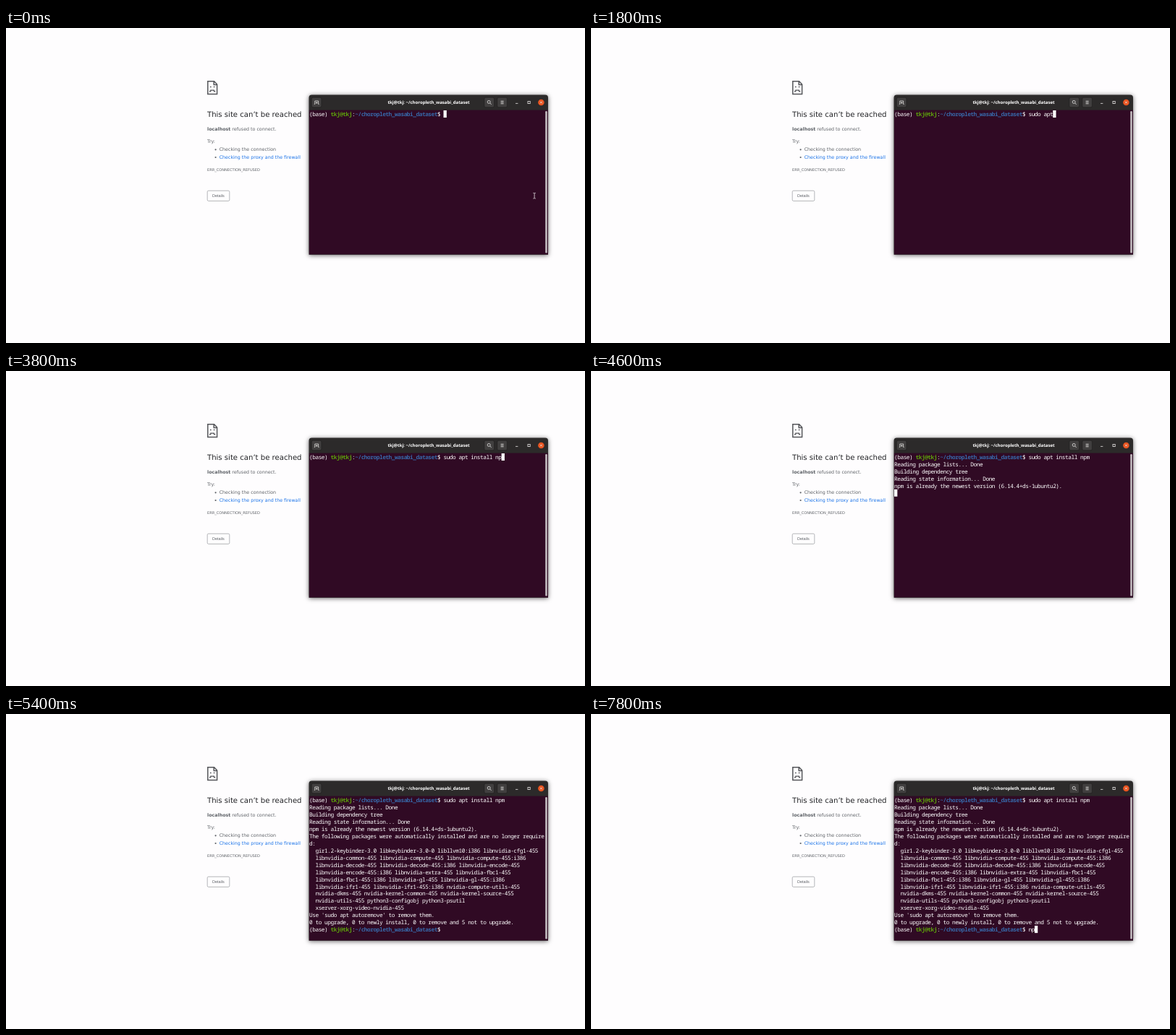
These frames come from a looping animation (800x436 px, 8 s). An HTML page:

```html
<!DOCTYPE html>
<html lang="en">
<head>
<meta charset="utf-8">
<title>Terminal install</title>
<style>
html, body { margin: 0; width: 800px; height: 436px; overflow: hidden; background: #fefdfe; }
svg { display: block; text-rendering: geometricPrecision; }
text { white-space: pre; }
.page { font: 6.32px "DejaVu Sans", sans-serif; fill: #5f6368; }
.term { font: 7.8px "Noto Sans Mono", monospace; fill: #fff; }
.user { fill: #5c9f0c; font-weight: 700; }
.path { fill: #3768a8; font-weight: 700; }
.line { fill: none; stroke: #e8e6e5; stroke-width: .8; }
.shadow { filter: drop-shadow(0 1px 3px rgba(0, 0, 0, .6)); }
</style>
</head>
<body>
<svg width="800" height="436" viewBox="0 0 800 436">
  <g fill="none" stroke="#55565a" stroke-width="1.5">
    <path d="M287.6 73.7H278.8V91.5H291.6V78ZM287.2 73.7V78.4H291.6"/>
    <path d="M281.6 88.6V87.6H282.8V86.2H287.4V87.6H288.6V88.6" stroke-width="1.2"/>
    <path d="M282 81.6h1.6M286.8 81.6h1.6"/>
  </g>
  <g class="page">
    <text x="278" y="123.4" font-size="10.1" style="font-size:10.1px" fill="#202124">This site can’t be reached</text>
    <text x="278" y="141.7"><tspan font-weight="700">localhost</tspan> refused to connect.</text>
    <text x="278" y="159.2">Try:</text>
    <circle cx="289.6" cy="168.3" r="1.1"/>
    <circle cx="289.6" cy="179" r="1.1"/>
    <text x="294.7" y="170.2">Checking the connection</text>
    <text x="294.7" y="180.9" fill="#1a73e8">Checking the proxy and the firewall</text>
    <text x="278" y="198.2" style="font-size:5.05px">ERR_CONNECTION_REFUSED</text>
    <rect x="278.2" y="225.2" width="30.6" height="14.2" rx="1.6" fill="none" stroke="#a3a5a9" stroke-width=".8"/>
    <text x="293.4" y="234.4" text-anchor="middle" style="font:5.5px 'Liberation Sans',sans-serif">Details</text>
  </g>

  <path class="shadow" d="M418.5 313.7V96.5a4 4 0 0 1 4-4H745a4 4 0 0 1 4 4V313.7Z" fill="#2c2a2a"/>
  <rect x="418.9" y="113.6" width="330" height="199.8" fill="#300a24"/>
  <rect x="745.2" y="115" width="2.6" height="196.6" rx="1.3" fill="#c3bcc0"/>
  <g fill="#413f3f" stroke="#1f1d1d" stroke-width=".6">
    <rect x="422.3" y="96.2" width="13.6" height="13.6" rx="2"/>
    <rect x="660.9" y="96.2" width="13.6" height="13.6" rx="2"/>
    <rect x="678.8" y="96.2" width="13.6" height="13.6" rx="2"/>
  </g>
  <g class="line">
    <path d="M425.8 105.4h1V101h4.8v4.4h1M429.2 102.2v2.6M427.9 103.5h2.6"/>
    <circle cx="667.2" cy="102.4" r="2"/>
    <path d="M668.7 103.9l2 2M683.6 101.2h4M683.6 103h4M683.6 104.8h4M704 104.4h3.4"/>
    <rect x="721" y="101.4" width="3.2" height="3.2"/>
    <circle cx="739.4" cy="103" r="4.3" fill="#e95420" stroke="none"/>
    <path d="M738 101.6l2.8 2.8M740.8 101.6l-2.8 2.8"/>
  </g>
  <text x="584" y="105.1" text-anchor="middle" fill="#fff" style="font:700 6.06px 'Open Sans',sans-serif">tkj@tkj: ~/choropleth_wasabi_dataset</text>
  <g id="screen" class="term"></g>
  <rect id="caret" width="4.3" height="10" fill="#fff"/>
  <path id="mouse" d="M728.4 228.4h1.2l.5.5l.5-.5h1.2M730.1 228.8v6.8M728.4 236h1.2l.5-.5l.5.5h1.2" fill="none" stroke="#d5cdd2" stroke-width=".9"/>
</svg>
<script>
const LOOP = 8000, LEFT = 419, TOP = 114, CELL = 4.216, ROW = 9.95, PROMPT_COLS = 44;
const PROMPT = '(base) <tspan class="user">tkj@tkj</tspan>:<tspan class="path">~/choropleth_wasabi_dataset</tspan>$ ';
const COMMAND = "sudo apt install npm";
const OUTPUT = `Reading package lists... Done
Building dependency tree
Reading state information... Done
npm is already the newest version (6.14.4+ds-1ubuntu2).
The following packages were automatically installed and are no longer require
d:
  gir1.2-keybinder-3.0 libkeybinder-3.0-0 libllvm10:i386 libnvidia-cfg1-455
  libnvidia-common-455 libnvidia-compute-455 libnvidia-compute-455:i386
  libnvidia-decode-455 libnvidia-decode-455:i386 libnvidia-encode-455
  libnvidia-encode-455:i386 libnvidia-extra-455 libnvidia-fbc1-455
  libnvidia-fbc1-455:i386 libnvidia-gl-455 libnvidia-gl-455:i386
  libnvidia-ifr1-455 libnvidia-ifr1-455:i386 nvidia-compute-utils-455
  nvidia-dkms-455 nvidia-kernel-common-455 nvidia-kernel-source-455
  nvidia-utils-455 python3-configobj python3-psutil
  xserver-xorg-video-nvidia-455
Use 'sudo apt autoremove' to remove them.
0 to upgrade, 0 to newly install, 0 to remove and 5 not to upgrade.`.split("\n");

// Each pair: time in ms, number of characters or lines visible from then on.
const TYPED = [[200, 1], [400, 2], [600, 3], [800, 4], [1000, 5], [1200, 6], [1600, 7], [1800, 8],
  [2000, 9], [2200, 11], [2400, 13], [2600, 15], [2800, 16], [3200, 17], [3400, 18], [3800, 19], [4200, 20]];
const PRINTED = [[4400, 1], [4600, 4], [4800, 17]];
const RETYPED = [[7200, 1], [7800, 2]];
const PROMPT_AT = 5000, BLINK = 600;

const byId = id => document.getElementById(id);
const screen = byId("screen"), caret = byId("caret"), mouse = byId("mouse");
const countAt = (steps, t) => steps.reduce((n, [at, value]) => t >= at ? value : n, 0);
const show = (el, on) => el.setAttribute("visibility", on ? "visible" : "hidden");
const textRow = (text, i) =>
  `<text x="${LEFT}" y="${TOP + i * ROW + 8.1}" letter-spacing="${CELL - 7.8 * .6}">${text}</text>`;
let shown = "";

function draw(t) {
  const typed = countAt(TYPED, t), printed = countAt(PRINTED, t), retyped = countAt(RETYPED, t);
  const rows = [PROMPT + COMMAND.slice(0, typed), ...OUTPUT.slice(0, printed)];
  let row = printed ? printed + 1 : 0;
  let col = printed ? 0 : PROMPT_COLS + typed;
  if (t >= PROMPT_AT) {
    rows.push(PROMPT + "np".slice(0, retyped));
    col = PROMPT_COLS + retyped;
  }
  const markup = rows.map(textRow).join("");
  if (markup !== shown) screen.innerHTML = shown = markup;
  caret.setAttribute("x", LEFT + col * CELL);
  caret.setAttribute("y", TOP + row * ROW);
  const blinkOff = t >= PROMPT_AT && t < 7200 && Math.floor((t - PROMPT_AT) / BLINK) % 2 === 0;
  show(caret, !blinkOff);
  show(mouse, t < 200);
}

const start = performance.now();
function tick() {
  draw((performance.now() - start) % LOOP);
  requestAnimationFrame(tick);
}
tick();
</script>
</body>
</html>
```
